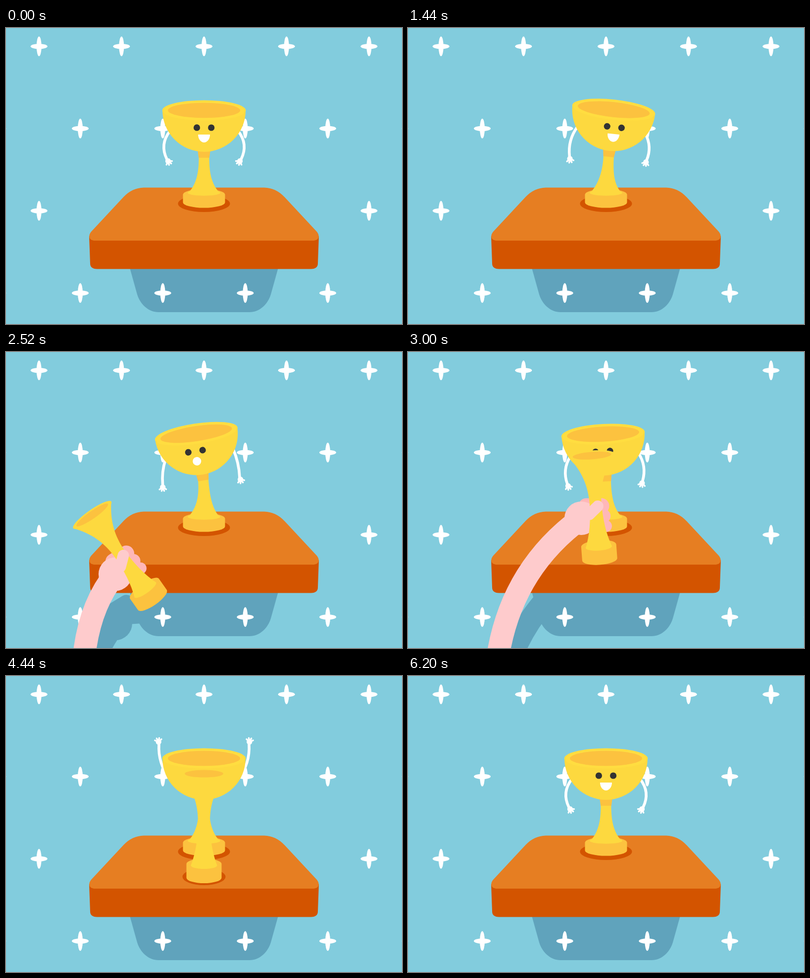
Write an HTML page with a canvas that moves like this. It is 800 px wide and 600 px high and loops after 6240 ms.

```html
<!DOCTYPE html>
<html lang="en">
<head>
<meta charset="utf-8">
<title>Jealous trophy</title>
<style>
  html, body { margin: 0; width: 100%; height: 100%; overflow: hidden; background: #82ccdd; }
  canvas { display: block; width: 800px; height: 600px; }
</style>
</head>
<body>
<canvas id="stage" width="800" height="600"></canvas>
<script>
const LOOP = 6240, BEAT = 640, TAU = Math.PI * 2, RAD = Math.PI / 180;
const C = {
  sky: '#82ccdd', shade: '#60a3bc', top: '#e67e22', side: '#d35400',
  gold: '#fdd93f', rim: '#ffdd40', amber: '#fcc23f', ink: '#333333',
  skin: '#fecbcc', finger: '#ffb7b8', white: '#ffffff'
};
const g = document.getElementById('stage').getContext('2d');

// ---------- timing helpers ----------
const clamp = u => Math.max(0, Math.min(1, u));
const span = (t, a, b) => clamp((t - a) / (b - a));
const ease = (t, a, b) => { const u = span(t, a, b); return u * u * (3 - 2 * u); };
const mix = (a, b, u) => a + (b - a) * u;
const mixAll = (a, b, u) => a.map((v, i) => mix(v, b[i], u));

// ---------- drawing helpers ----------
function fill(color) {
  g.fillStyle = color;
  g.fill();
}
function ellipse(x, y, rx, ry, color) {
  g.beginPath();
  g.ellipse(x, y, rx, ry, 0, 0, TAU);
  fill(color);
}
function shape(d, color) {
  g.fillStyle = color;
  g.fill(new Path2D(d));
}
function stroke(width, color) {
  g.lineWidth = width;
  g.lineCap = 'round';
  g.strokeStyle = color;
  g.stroke();
}
function capsule([x0, y0, x1, y1, w], color) {
  g.beginPath();
  g.moveTo(x0, y0);
  g.lineTo(x1, y1);
  stroke(w, color);
}
function at(x, y, deg, draw) {
  g.save();
  g.translate(x, y);
  g.rotate(deg * RAD);
  draw();
  g.restore();
}
function spin(x, y, deg) {
  const c = Math.cos(deg * RAD), s = Math.sin(deg * RAD);
  return [x * c - y * s, x * s + y * c];
}
// lower half of one ellipse joined to the upper half of another
function halves(y0, rx, down, y1, up, color) {
  g.beginPath();
  g.ellipse(0, y0, rx, down, 0, 0, Math.PI);
  g.ellipse(0, y1, rx, up, 0, Math.PI, TAU);
  fill(color);
}

// ---------- scenery ----------
const STEP = 500 / 3;
function stars() {
  for (let row = 0; row < 4; row++)
    for (let col = -1; col < 6; col++) {
      const x = 66.7 + STEP * (col + (row % 2) / 2), y = 37.2 + STEP * row;
      ellipse(x, y, 17, 5.3, C.white);
      ellipse(x, y, 5, 20, C.white);
    }
}
function podium() {
  shape('M168 422L170 477Q170 488.4 184 488.4H616Q630 488.4 630 477L632 422Z', C.side);
  shape('M278 323.5H522C537 324 551 330 563 343L628 413C635 422 632 431 620 431' +
        'H180C168 431 165 422 172 413L237 343C249 330 263 324 278 323.5Z', C.top);
  ellipse(400, 356, 52.5, 17, C.side);
}
const podiumShade = () =>
  shape('M250 486L265 540C271 560 288 576 308 576H492C512 576 529 560 535 540L550 486Z', C.shade);

// ---------- living cup ----------
// arm: [wrist x, wrist y, bend, hand direction], described for the left side
const REST = [325, 266, 18, 57], RAISED = [309, 138, -14, 260], PUSH = [307, 233, 19, 55];

function swing(s, reach) {
  const k = Math.abs(s);
  const trail = [325 - reach * k, 266 + 6 * k, 18 - 21 * k, 57 + 52 * k];
  const lead = [325 + 5 * k, 266 - 20 * k, 18 - 21 * k, 57 + 89 * k];
  return s < 0 ? [trail, lead] : [lead, trail];
}

function swayPose(t) {
  const s = Math.sin(Math.PI * t / BEAT);
  const lag = Math.sin(Math.PI * Math.max(0, t - 50) / BEAT);
  const bob = Math.cos(Math.PI * (t - 80) / (BEAT / 2)) ** 2 * span(t, 0, 80);
  return { x: 22 * s, y: -3 * bob, tilt: 8.7 * s, arms: swing(lag * Math.abs(lag), 27) };
}
function shockPose(t) {
  const back = 1 - ease(t, 2780, 3160);
  return {
    x: -15.7 * ease(t, 1920, 2110) * back,
    y: -1.5 * back,
    tilt: -8.6 * ease(t, 1920, 2170) * back,
    arms: swing(-0.6 * ease(t, 1920, 2090) * back, 14)
  };
}
function angryPose(t) {
  const calm = 1 - (1 - span(t, 5180, 6200)) ** 3;
  let arm = mixAll(REST, RAISED, ease(t, 3880, 4180));
  arm = mixAll(arm, PUSH, ease(t, 4460, 4680));
  arm = mixAll(arm, REST, calm);
  return { x: 0, y: 0, tilt: 0, arms: [arm, arm] };
}
const cupPose = t => (t < 1920 ? swayPose : t < 3880 ? shockPose : angryPose)(t);

function drawArm(sx, sy, [wx, wy, bend, dir]) {
  const dx = wx - sx, dy = wy - sy, len = Math.hypot(dx, dy);
  g.beginPath();
  g.moveTo(sx, sy);
  g.quadraticCurveTo((sx + wx) / 2 - bend * dy / len, (sy + wy) / 2 + bend * dx / len, wx, wy);
  stroke(5.6, C.white);
  const [px, py] = spin(4.5, 0, dir);
  at(wx + px, wy + py, dir, () => {
    ellipse(0, 0, 5.6, 5.6, C.white);
    for (let a = -57; a <= 57; a += 38) capsule([0, 0, ...spin(8, 0, a), 3.4], C.white);
  });
}

// mouth: [middle y, half width, upper height, lower height]
const SMILE = [49, 12, 0, 16], GASP = [55.5, 8.6, 8.6, 8.6], FROWN = [65, 8.6, 13.2, 0];

function face(t, tilt) {
  const anger = ease(t, 3600, 3800) - ease(t, 5280, 5440);
  let mouth = mixAll(SMILE, GASP, ease(t, 1930, 2020));
  mouth = mixAll(mouth, FROWN, ease(t, 3600, 3800));
  mouth = mixAll(mouth, SMILE, ease(t, 5280, 5480));

  g.save();
  g.translate(tilt * 0.8, 0);
  for (const side of [-1, 1]) {
    g.save();
    g.translate(side * 14.6, 35);
    g.scale(side, 1);
    g.beginPath();
    g.moveTo(-8, mix(-9, 2, anger));
    g.lineTo(8, mix(-9, -5, anger));
    g.lineTo(8, 9);
    g.lineTo(-8, 9);
    g.clip();
    ellipse(0, 0, 6.6, 6.6, C.ink);
    g.restore();
  }
  const [y, w, up, down] = mouth;
  halves(y, w, down, y, up, C.white);
  g.restore();
}

function cup(t) {
  const p = cupPose(t), bx = 400 + p.x, by = 167 + p.y;
  const local = (x, y) => { const [u, v] = spin(x, y, p.tilt); return [bx + u, by + v]; };

  drawArm(...local(-69, 42), p.arms[0]);
  g.save();
  g.translate(800, 0);
  g.scale(-1, 1);
  const [sx, sy] = local(69, 42);
  drawArm(800 - sx, sy, p.arms[1]);
  g.restore();

  at(400, 353.5, 0, () => halves(0, 42.5, 11, -16, 11, C.amber));
  ellipse(400, 334, 33, 6, C.gold);

  const [lx, ly] = local(-10.5, 95), [rx, ry] = local(10.5, 95);
  const [nx, ny] = spin(0, 37, p.tilt / 2);
  g.beginPath();
  g.moveTo(369, 334);
  g.bezierCurveTo(383, 317, lx + nx, ly + ny, lx, ly);
  g.lineTo(rx, ry);
  g.bezierCurveTo(rx + nx, ry + ny, 417, 317, 431, 334);
  fill(C.gold);

  at(bx, by, p.tilt, () => {
    shape('M-13 80H13L10.8 96H-10.8Z', C.amber);
    halves(0, 84, 84, 0, 0, C.gold);
    ellipse(0, 0, 84.3, 20.5, C.rim);
    ellipse(0, 0, 73, 15.3, C.amber);
    face(t, p.tilt);
  });
}

// ---------- rival trophy ----------
const APEX = 4860;
function rivalPose(t) {
  const rise = ease(t, 2000, 2440), place = ease(t, 2500, 3140), leap = ease(t, 4440, APEX);
  const fall = Math.max(0, t - APEX) / 180;
  return {
    x: mix(mix(288, 295.5, rise), 400, place),
    y: mix(mix(mix(830, 503, rise), 409, place), 235, leap) + 170 * fall * fall,
    rot: mix(-35.3, 0, place),
    tip: leap
  };
}

// tip 0: upright; tip 1: rim facing the viewer
function rival({ x, y, rot, tip }) {
  const len = mix(211, 20, tip), b = mix(1, 0.8, tip);
  const rx = mix(47, 105.3, tip), ry = mix(10.5, 102, tip);
  const k = (len - 25 * b) / 186, Y = v => -25 * b - (v - 25) * k;
  at(x, y, rot, () => {
    halves(0, 35.5 * b, 11 * b, -28 * b, 11 * b, C.amber);
    ellipse(0, -25 * b, 26.5 * b, 7 * b, C.gold);
    for (const s of [-1, 1]) {
      g.beginPath();
      g.moveTo(-s, -len);
      g.lineTo(s * rx, -len);
      g.bezierCurveTo(s * rx * 0.47, Y(180), s * 12.5, Y(150), s * 12, Y(115));
      g.bezierCurveTo(s * 12, Y(80), s * 17 * b, Y(50), s * 26.5 * b, -25 * b);
      g.lineTo(-s, -25 * b);
      fill(C.gold);
    }
    ellipse(0, -len, rx, ry, C.gold);
    ellipse(0, -len, mix(39, 85, tip), mix(7.6, 82, tip), C.amber);
  });
}

// ---------- giving hand ----------
function handPose(t) {
  const r = rivalPose(Math.min(t, 3200)), [gx, gy] = spin(-31, -86, r.rot);
  const held = [r.x + gx, r.y + gy, r.rot + 35.3];
  const [x, y, rot] = mixAll(held, [288, 530, 0], span(t, 3200, 3560) ** 1.4);
  const gone = span(t, 3560, 3760);
  const reach = mixAll([-66, 199], [-189, 337], ease(t, 2520, 3140));
  return {
    x: x - 12 * gone,
    y: y + 170 * gone + 90 * gone * gone,
    rot,
    elbow: mixAll(reach, [24, 130], ease(t, 3220, 3550)),
    open: ease(t, 3200, 3400)
  };
}

function handBack(h, shade) {
  const skin = shade || C.skin, [ex, ey] = h.elbow;
  at(h.x, h.y, h.rot, () => {
    for (let i = 0; i < 3; i++) {
      const fist = [-4 + 12 * i, -26 + 8 * i, 22 + 14.5 * i, -42 + 15 * i, 32 - 4 * i];
      const open = [-17 + 21.5 * i, -23 + 4 * i, -8 + 25.5 * i, -56 + 4.2 * i * i, 20];
      capsule(mixAll(fist, open, h.open), shade || C.finger);
    }
  });
  at(h.x, h.y, 0, () => {
    g.beginPath();
    g.moveTo(0, 0);
    g.quadraticCurveTo(ex * 0.9, ey * 0.36, ex, ey);
    stroke(46, skin);
    ellipse(0, 0, 34, 34, skin);
  });
}
const thumb = h => at(h.x, h.y, h.rot, () =>
  capsule(mixAll([10, -15, 16, -38, 23], [1, -20, 3, -33, 23], h.open), C.skin));

// ---------- scene ----------
function scene(t) {
  const r = rivalPose(t), h = handPose(t);
  const handOn = t > 1960 && t < 3840, rivalOn = t > 1960 && t < 5400;

  g.fillStyle = C.sky;
  g.fillRect(0, 0, 800, 600);
  podiumShade();
  if (handOn) handBack({ ...h, y: h.y + 100 }, C.shade);
  if (t > APEX && rivalOn) ellipse(400, r.y + 240, 51, 51, C.shade);
  stars();
  podium();
  cup(t);

  const hole = ease(t, 3020, 3140) - ease(t, 4470, 4640);
  ellipse(400, 407, 43.5 * hole, 17 * hole, C.side);
  if (handOn) handBack(h);
  if (rivalOn) rival(r);
  if (handOn) thumb(h);
}

const start = performance.now();
function tick() {
  scene((performance.now() - start) % LOOP);
  requestAnimationFrame(tick);
}
tick();
</script>
</body>
</html>
```
